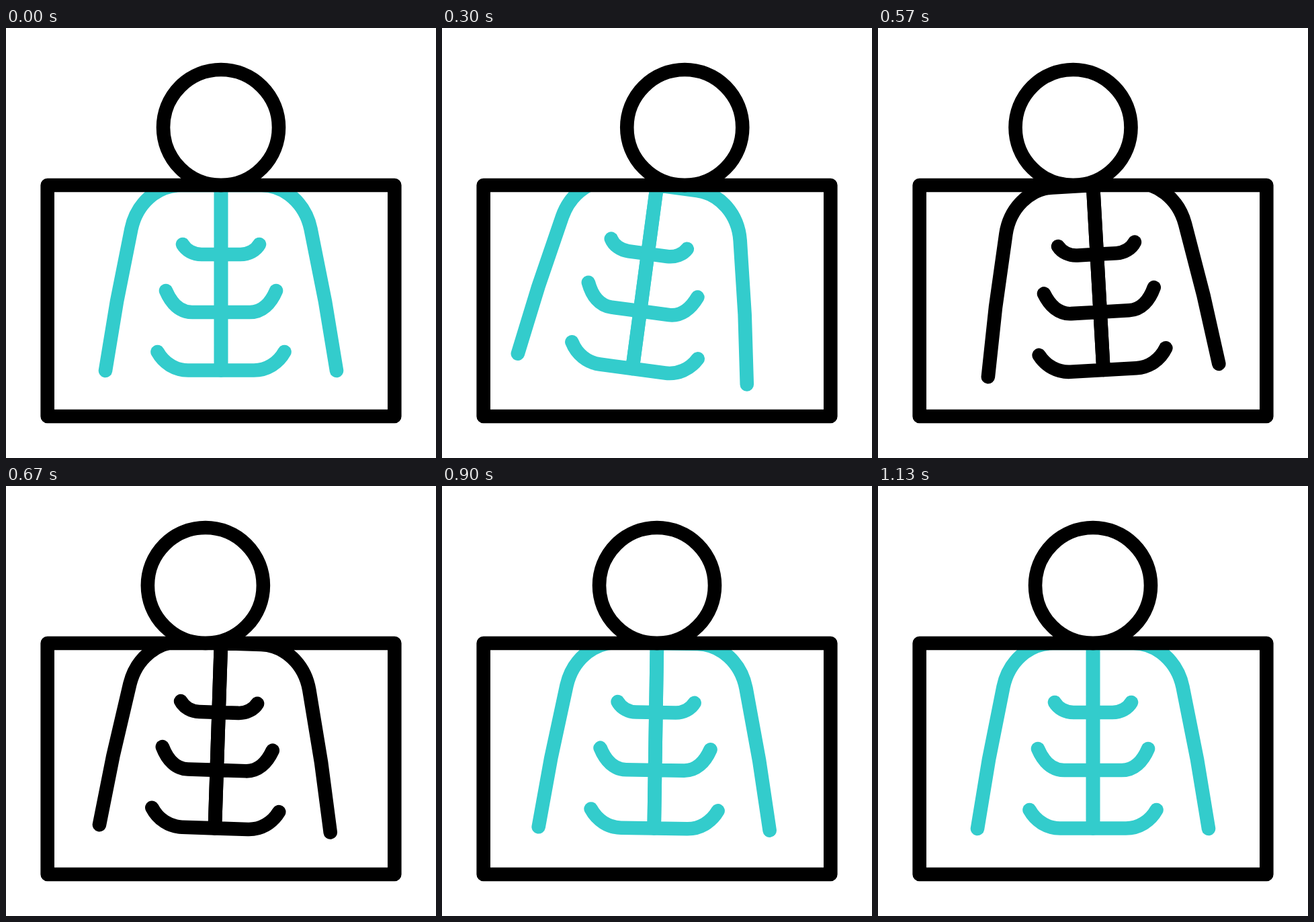
An HTML page that plays this animation: 640 by 640 pixels, repeating every 1670 ms.

```html
<!DOCTYPE html>
<html lang="en">
<head>
<meta charset="utf-8">
<title>X-ray</title>
<style>
  html, body { margin: 0; width: 100%; height: 100%; overflow: hidden; background: #fff; }
  svg { display: block; width: 100%; height: 100%; }
</style>
</head>
<body>
<svg viewBox="0 0 640 640" fill="none" stroke="#000" stroke-width="20.6" stroke-linecap="round" stroke-linejoin="round">
  <defs>
    <clipPath id="screen"><path d="M62 234H578V578H62Z"/></clipPath>
    <!-- Half a torso, drawn around the neck -->
    <path id="half" d="M0 0H-60C-95 0-125.500 27-133.500 65L-155 173L-172 276
      M0 0V275.500
      M0 103H-29C-41 103-52 97-57 88
      M0 189H-43C-61 189-74 176-82 157
      M0 275.500H-49C-68 275.500-85 265-94.500 248"/>
  </defs>
  <g clip-path="url(#screen)">
    <g id="torso" transform="translate(320 234)">
      <use href="#half"/>
      <use href="#half" transform="scale(-1 1)"/>
    </g>
  </g>
  <circle id="head" cx="320" cy="148" r="86"/>
  <path d="M61.700 234H578.300V578H61.700Z"/>
</svg>
<script>
  const LOOP = 1670, TICK = 100 / 3;
  const TEAL = "#33cccc", BLACK = "#000";

  // [tick, value] pairs, eased in and out between neighbours
  const headShift = [[2, 0], [9.8, 42.5], [17, -29.5], [27, 0]];
  const torsoTurn = [[2, 0], [8.3, 7.9], [16.2, -3.9], [20, 1.9], [33.5, 0]];

  const head = document.getElementById("head");
  const torso = document.getElementById("torso");

  function valueAt(keys, tick) {
    const next = keys.findIndex(([at]) => at > tick);
    if (next === 0) return keys[0][1];
    if (next < 0) return keys[keys.length - 1][1];
    const [t0, v0] = keys[next - 1], [t1, v1] = keys[next];
    const p = (tick - t0) / (t1 - t0);
    return v0 + (v1 - v0) * p * p * (3 - 2 * p);
  }

  function draw(time) {
    // Steps at 30 per second, starting on whole hundredths
    const tick = Math.floor((time % LOOP + 3.4) / TICK);
    head.setAttribute("cx", 320 + valueAt(headShift, tick));
    torso.setAttribute("transform", `translate(320 234) rotate(${valueAt(torsoTurn, tick)})`);
    torso.setAttribute("stroke", tick >= 11 && tick < 25 ? BLACK : TEAL);
  }

  let start;
  function run(now) {
    start ??= now;
    draw(now - start);
    requestAnimationFrame(run);
  }
  draw(0);
  requestAnimationFrame(run);
</script>
</body>
</html>
```
